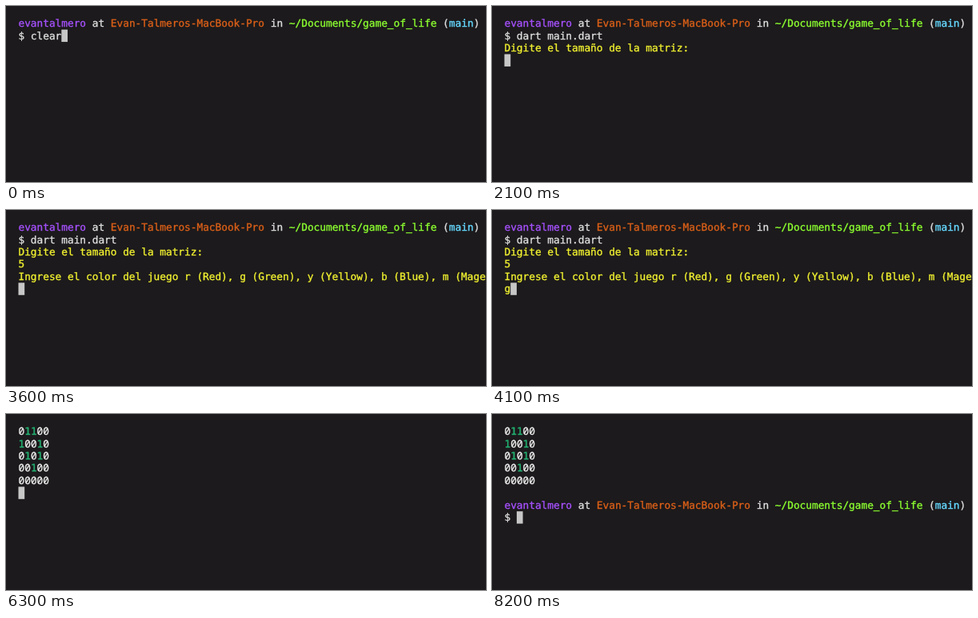
Animation of 600x221 px, one loop 8900 ms. Source, as an HTML page with a canvas:

```html
<!DOCTYPE html>
<html lang="es">
<head>
<meta charset="utf-8">
<title>Game of life</title>
<style>
  html, body { margin: 0; width: 100%; height: 100%; overflow: hidden; background: #1c1a1c; }
  canvas { display: block; }
</style>
</head>
<body>
<canvas id="stage" width="600" height="221"></canvas>
<script>
const ctx = document.getElementById('stage').getContext('2d');
const LOOP = 8900;
const LEFT = 15.5, TOP = 14.2, CELL = 7.69, LINE = 15.43, BASELINE = 11.9;
const FONT = '12.78px "DejaVu Sans Mono", monospace';
const ZERO_FONT = '12.78px "Noto Sans Mono", monospace';
const color = {
  back: '#1c1a1c', plain: '#dedede', cursor: '#c7c7c7', user: '#a450fa', host: '#d95f18',
  path: '#8cff30', branch: '#66d9ff', ask: '#f0f030', dead: '#f0f0f0', alive: '#22b573'
};
ctx.textRendering = 'geometricPrecision';
ctx.lineJoin = 'round';
ctx.lineWidth = 0.35;

const prompt = [
  ['evantalmero', color.user], [' at '], ['Evan-Talmeros-MacBook-Pro', color.host],
  [' in '], ['~/Documents/game_of_life', color.path], [' ('], ['main', color.branch], [')']
];
const run = [['$ dart main.dart']];
const yellow = text => [[text, color.ask]];
const sizeQuestion = yellow('Digite el tamaño de la matriz:');
const colorQuestion = yellow('Ingrese el color del juego r (Red), g (Green), y (Yellow), b (Blue), m (Magenta), c (Cyan)');

function nextGeneration(grid) {
  const at = (r, c) => Number(grid[r]?.[c] ?? 0);
  return grid.map((row, r) => [...row].map((cell, c) => {
    let near = -at(r, c);
    for (let y = -1; y <= 1; y++)
      for (let x = -1; x <= 1; x++) near += at(r + y, c + x);
    return near === 3 || (near === 2 && cell === '1') ? '1' : '0';
  }).join(''));
}

const generations = [['01000', '10100', '00010', '10100', '00000']];
for (let i = 0; i < 3; i++) generations.push(nextGeneration(generations[i]));
const gridLines = generations.map(grid => grid.map(row =>
  [...row].map(n => [n, n === '1' ? color.alive : color.dead])));

// Each screen is a list of lines; the cursor follows the last one.
const started = [prompt, run];
const asked = [...started, sizeQuestion];
const answered = [...asked, yellow('5')];
const askedColor = [...answered, colorQuestion];
const screens = [
  [0, [prompt, [['$ clear']]]],
  [100, [prompt, [['$ ']]]],
  [300, started],
  [500, [...started, []]],
  [1600, [...asked, []]],
  [2600, answered],
  [3300, [...askedColor, []]],
  [4000, [...askedColor, yellow('g')]],
  [4400, [...gridLines[0], []]],
  [5000, [...gridLines[1], []]],
  [5700, [...gridLines[2], []]],
  [6300, [...gridLines[3], []]],
  [7300, [...gridLines[3], [], prompt, [['$ ']]]]
];

function drawLine(parts, row) {
  const y = TOP + row * LINE + BASELINE;
  let col = 0;
  for (const [text, fill = color.plain] of parts) {
    const x = LEFT + col * CELL;
    ctx.font = text === '0' ? ZERO_FONT : FONT;
    ctx.fillStyle = ctx.strokeStyle = fill;
    ctx.fillText(text, x, y);
    ctx.strokeText(text, x, y);
    col += text.length;
  }
  return col;
}

function drawCursor(col, row) {
  ctx.fillStyle = color.cursor;
  ctx.fillRect(LEFT + col * CELL, TOP + row * LINE, CELL, LINE);
}

function frame() {
  const time = performance.now() % LOOP;
  const lines = screens.findLast(([start]) => start <= time)[1];
  ctx.fillStyle = color.back;
  ctx.fillRect(0, 0, 600, 221);
  let col = 0;
  lines.forEach((line, row) => { col = drawLine(line, row); });
  drawCursor(col, lines.length - 1);
  requestAnimationFrame(frame);
}
frame();
</script>
</body>
</html>
```
